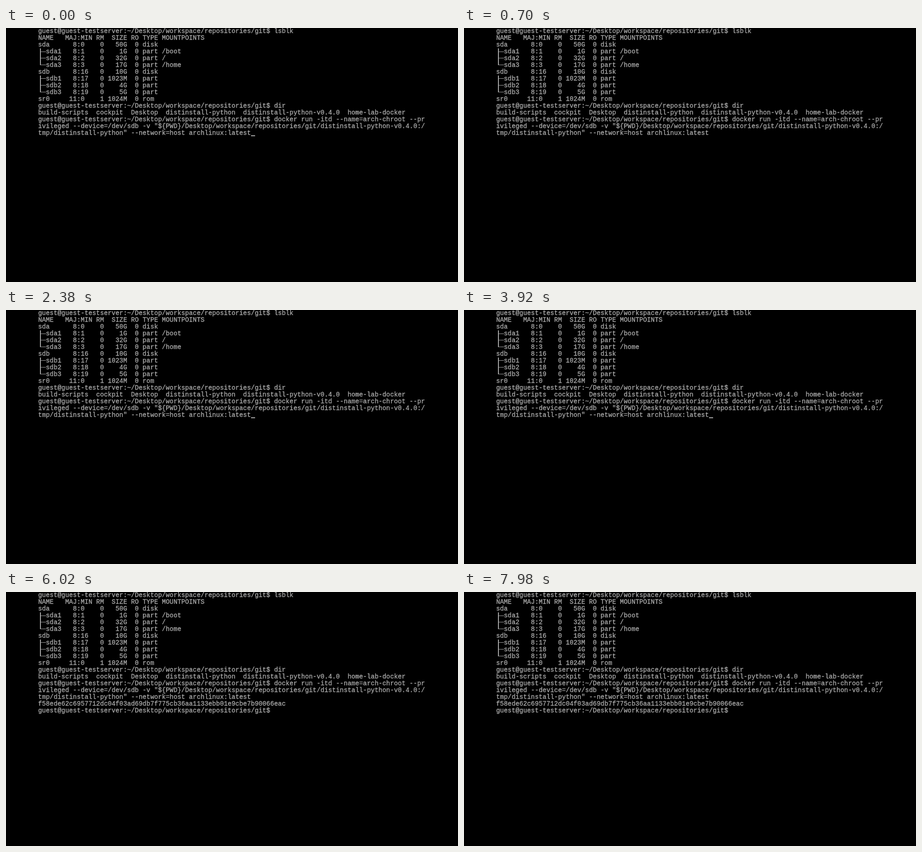
Animation, 998 px wide and 561 px high, one loop 8000 ms. Source, as an HTML page with a canvas:

```html
<!DOCTYPE html>
<html lang="en">
<head>
<meta charset="utf-8">
<title>Terminal</title>
<style>
  html, body { margin: 0; width: 100%; height: 100%; overflow: hidden; background: #000; }
  canvas { display: block; }
</style>
</head>
<body>
<canvas id="screen" width="998" height="561"></canvas>
<script>
const ctx = document.getElementById("screen").getContext("2d");

const LOOP = 8000, ENTER_AT = 4500, HASH_AT = 5040, PROMPT_AT = 5300;
const LEFT = 71, CELL_W = 8.54, CELL_H = 14.97, BASELINE = 11.2;
const INK = "#aaa";

const prompt = "guest@guest-testserver:~/Desktop/workspace/repositories/git$ ";
const lines = [
  prompt + "lsblk",
  "NAME   MAJ:MIN RM  SIZE RO TYPE MOUNTPOINTS",
  "sda      8:0    0   50G  0 disk",
  "├─sda1   8:1    0    1G  0 part /boot",
  "├─sda2   8:2    0   32G  0 part /",
  "└─sda3   8:3    0   17G  0 part /home",
  "sdb      8:16   0   10G  0 disk",
  "├─sdb1   8:17   0 1023M  0 part",
  "├─sdb2   8:18   0    4G  0 part",
  "└─sdb3   8:19   0    5G  0 part",
  "sr0     11:0    1 1024M  0 rom",
  prompt + "dir",
  "build-scripts  cockpit  Desktop  distinstall-python  distinstall-python-v0.4.0  home-lab-docker",
  prompt + "docker run -itd --name=arch-chroot --pr",
  'ivileged --device=/dev/sdb -v "${PWD}/Desktop/workspace/repositories/git/distinstall-python-v0.4.0:/',
  'tmp/distinstall-python" --network=host archlinux:latest',
  "f58ede62c6957712dc04f03ad69db7f775cb36aa1133ebb01e9cbe7b90066eac",
  prompt
];

function drawBranch(char, x, top) {
  const middle = Math.round(top + 6.6);
  const start = Math.round(top);
  const end = char === "├" ? Math.round(top + CELL_H) : middle + 1;
  if (char !== "─") ctx.fillRect(x + 4, start, 2, end - start);
  const inset = char === "─" ? 0 : 4;
  ctx.fillRect(x + inset, middle, CELL_W - inset, 1);
}

function drawLine(text, row) {
  const top = row * CELL_H;
  [...text].forEach((char, column) => {
    const x = LEFT + column * CELL_W;
    if ("├└─".includes(char)) {
      drawBranch(char, x, top);
    } else if (char !== " ") {
      ctx.fillText(char, x, top + BASELINE);
      ctx.strokeText(char, x, top + BASELINE);
    }
  });
}

function cursorAt(t) {
  if (t < ENTER_AT) return [55, 15];
  if (t < HASH_AT) return [0, 16];
  return t < PROMPT_AT ? [0, 17] : [prompt.length, 17];
}

function cursorVisible(t) {
  // Pressing Enter restarts the blink.
  const start = t < ENTER_AT ? -80 : ENTER_AT;
  return (t - start) % 400 < 200;
}

function render(t) {
  ctx.fillStyle = "#000";
  ctx.fillRect(0, 0, 998, 561);
  ctx.fillStyle = ctx.strokeStyle = INK;
  ctx.lineWidth = 0.35;
  ctx.font = '14.2px "Liberation Mono", monospace';

  const shown = t < HASH_AT ? 16 : t < PROMPT_AT ? 17 : 18;
  lines.slice(0, shown).forEach(drawLine);

  if (cursorVisible(t)) {
    const [column, row] = cursorAt(t);
    ctx.fillRect(Math.round(LEFT + column * CELL_W), Math.round(row * CELL_H + 12.4), 9, 2);
  }
}

const began = performance.now();
function tick() {
  render((performance.now() - began) % LOOP);
  requestAnimationFrame(tick);
}
tick();
</script>
</body>
</html>
```
